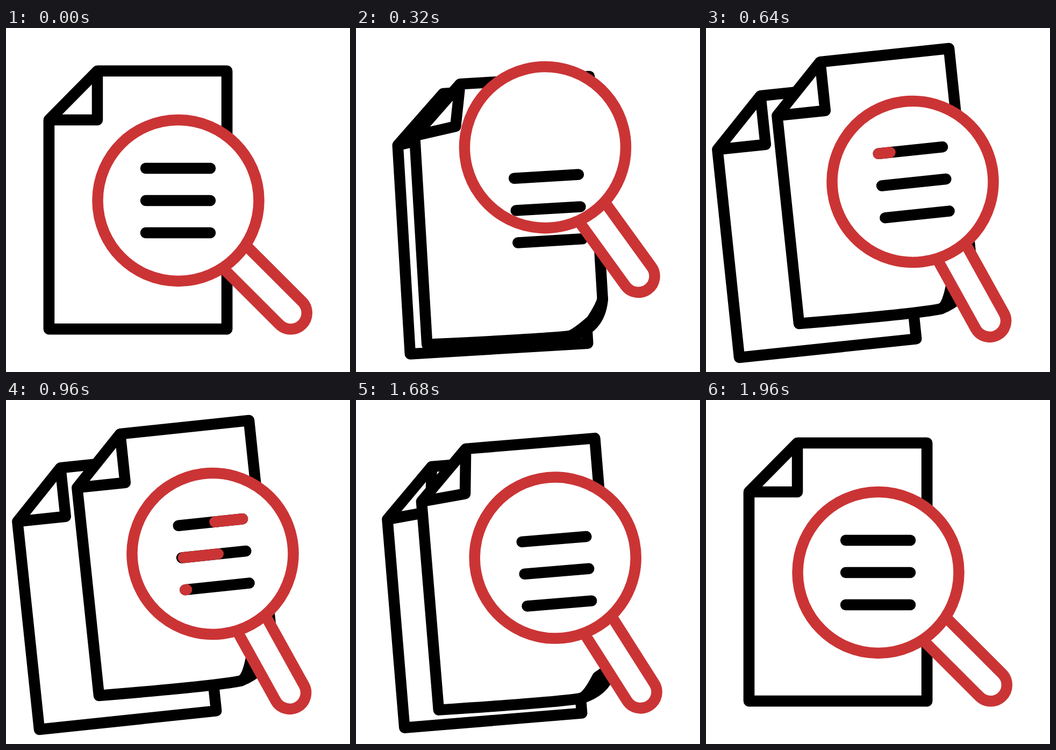
Recreate the animation shown at these times as an HTML page. Size 640 by 640 pixels, loop 2 s.

```html
<!DOCTYPE html>
<html lang="en">
<head>
<meta charset="utf-8">
<title>Document search</title>
<style>
  html, body { margin: 0; width: 100%; height: 100%; overflow: hidden; background: #fff; }
  svg { display: block; width: 100vw; height: 100vh; }
  path, circle { stroke-width: 20.5; stroke-linecap: round; stroke-linejoin: round; fill: #fff; }
  .ink { stroke: #000; }
  .red { stroke: #cb3435; }
  .line { fill: none; }
  .butt { stroke-linecap: butt; }
</style>
</head>
<body>
<svg viewBox="0 0 640 640">
  <path id="back" class="ink"/>
  <g id="front">
    <path id="sheet" class="ink"/>
    <path id="flap" class="ink"/>
  </g>
  <circle id="glass" r="150"/>
  <g id="text"></g>
  <g id="loupe">
    <path class="red butt" d="M147 -30H296a30 30 0 0 1 0 60H147"/>
    <circle class="red line" r="150"/>
  </g>
</svg>
<script>
const LOOP = 2000, STEP = 40;
const LINE_X = 14.5, LINE_LEN = 120, LINE_YS = [-59, 1, 61];
const el = id => document.getElementById(id);

function addLine(cls) {
  const path = document.createElementNS('http://www.w3.org/2000/svg', 'path');
  path.setAttribute('class', cls + ' line');
  el('text').append(path);
  return path;
}

const segment = (y, from, to) =>
  `M${LINE_X + LINE_LEN * from} ${y}H${LINE_X + LINE_LEN * to}`;

LINE_YS.forEach(y => addLine('ink').setAttribute('d', segment(y, 0, 1)));
const marks = LINE_YS.map(() => addLine('red'));

// Smooth 0..1 ramp between two times
function ramp(t, start, end) {
  const u = Math.min(1, Math.max(0, (t - start) / (end - start)));
  return u * u * (3 - 2 * u);
}

// Rises over one span of time, falls back over another
const swing = (t, rise, peak, fall, end) => ramp(t, rise, peak) - ramp(t, fall, end);

// Page outline around its centre; bend (0..1) curls the lower right corner
function pagePath(fold, cut, bend) {
  const f = -75.5 - fold, g = -149 - fold, pull = 14 * bend;
  return `M-75.5 -240H165.5V${240 - cut}` +
    `Q${165.5 - pull} ${240 - pull} ${165.5 - cut} 240` +
    `Q60 ${240 + 5 * bend} -165.5 240` +
    `V-149L-75.5 -240L${f} ${g}L-165.5 -149`;
}

function flapPath(cut, bend) {
  const at = (x, y) => `${165.5 - x} ${240 - y} `;
  const tip = at(40 * bend, 47 * bend);
  return 'M' + at(cut, 0) +
    'Q' + at(cut * .8, cut * .06) + tip +
    'Q' + at(cut * .06, cut * .8) + at(0, cut);
}

function place(node, x, y, angle) {
  node.setAttribute('transform', `translate(${x} ${y}) rotate(${angle})`);
}

function draw(t) {
  const home = ramp(t, 1560, 1960);
  const turn = ramp(t, 80, 520) - home;
  const slide = swing(t, 72, 530, 1565, 1965);
  const drop = swing(t, 80, 280, 1760, 1960);
  const spread = swing(t, 200, 542, 1540, 1850);
  const lift = swing(t, 200, 545, 1540, 1830);
  const fold = 14 * (swing(t, 80, 280, 280, 520) + swing(t, 1560, 1780, 1780, 1960));
  const cut = 65 * Math.min(1, turn * 3.5);

  const x = 245.5 + 67 * slide, y = 320 + 37 * drop, tilt = -6 * turn;
  place(el('back'), x - 111 * spread, y, tilt);
  for (const id of ['front', 'text']) place(el(id), x, y - 63 * lift, tilt);
  el('back').setAttribute('d', pagePath(fold, 0, 0));
  el('sheet').setAttribute('d', pagePath(fold, cut, turn));
  el('flap').setAttribute('d', flapPath(cut, turn));

  const lensX = 320.5 + 64 * swing(t, 160, 484, 1560, 1960);
  const lensY = 321 - 100 * ramp(t, 80, 300) + 65 * ramp(t, 300, 560) + 35 * home;
  place(el('glass'), lensX, lensY, 0);
  place(el('loupe'), lensX, lensY, 45 + 16 * turn);

  marks.forEach((mark, i) => {
    const start = 520 + 200 * i;
    const head = ramp(t, start, start + 440);
    const tail = ramp(t, start + 200, start + 640);
    mark.setAttribute('d', head > tail ? segment(LINE_YS[i], tail, head) : '');
  });
}

const begin = performance.now();
function tick() {
  const t = (performance.now() - begin) % LOOP;
  draw(Math.floor(t / STEP) * STEP);
  requestAnimationFrame(tick);
}
tick();
</script>
</body>
</html>
```
